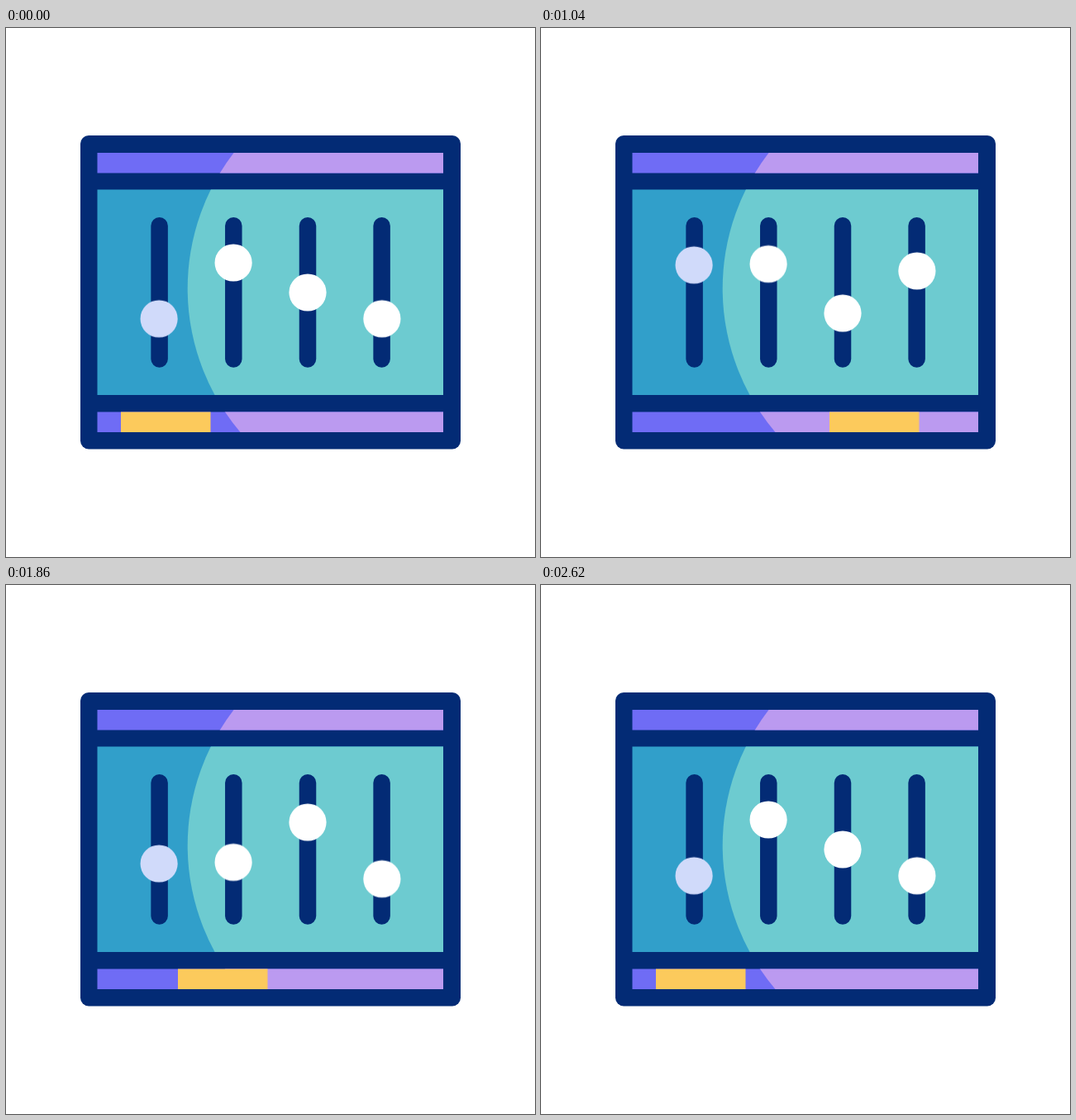
Animation of 640 by 640 pixels, one loop 3 s. Source, as an HTML page:

```html
<!DOCTYPE html>
<html lang="en">
<head>
<meta charset="utf-8">
<title>Mixer panel</title>
<style>
  html, body { margin: 0; width: 100%; height: 100%; overflow: hidden; background: #fff; }
  svg { display: block; width: 100%; height: 100%; }

  .move {
    animation: 3s cubic-bezier(.3333, 0, .6667, 1) infinite;
  }
  #bar { animation-name: bar; }
  #k1 { animation-name: k1; }
  #k2 { animation-name: k2; }
  #k3 { animation-name: k3; }
  #k4 { animation-name: k4; }

  @keyframes bar {
    0%, 6.667%    { transform: translateX(139px); }
    43.333%       { transform: translateX(383px); }
    73.333%       { transform: translateX(126px); }
    86.667%, 100% { transform: translateX(139px); }
  }
  @keyframes k1 {
    0%, 6.667%        { transform: translateY(351.8px); }
    33.333%, 46.667%  { transform: translateY(286.8px); }
    71.667%           { transform: translateY(362px); }
    86.667%, 100%     { transform: translateY(351.8px); }
  }
  @keyframes k2 {
    0%, 13.333%       { transform: translateY(284px); }
    26.667%           { transform: translateY(271.6px); }
    53.333%, 61.667%  { transform: translateY(335.5px); }
    83.333%, 100%     { transform: translateY(284px); }
  }
  @keyframes k3 {
    0%, 6.667%  { transform: translateY(320px); }
    26.667%     { transform: translateY(358.6px); }
    56.667%     { transform: translateY(282px); }
    80%, 100%   { transform: translateY(320px); }
  }
  @keyframes k4 {
    0%, 16.667%   { transform: translateY(351.8px); }
    43.333%       { transform: translateY(275px); }
    66.667%       { transform: translateY(364.8px); }
    86.667%, 100% { transform: translateY(351.8px); }
  }
</style>
</head>
<body>
<svg viewBox="0 0 640 640">
  <defs>
    <clipPath id="strips">
      <path d="M110.5 151h418.5v24.5h-418.5zM110.5 464.5h418.5v24.5h-418.5z"/>
    </clipPath>
    <clipPath id="panel"><rect x="110.5" y="195.5" width="418.5" height="248.5"/></clipPath>
  </defs>

  <rect x="90" y="130" width="460" height="379.5" rx="10" fill="#032b75"/>

  <g clip-path="url(#strips)">
    <rect x="110" y="150" width="420" height="340" fill="#6f6cf5"/>
    <path d="M530 140H284.5A269 269 0 0 0 290.5 497H530z" fill="#bb9af0"/>
    <rect id="bar" class="move" y="464" width="108.5" height="26" fill="#fcca5c"/>
  </g>

  <g clip-path="url(#panel)">
    <rect x="110" y="195" width="420" height="250" fill="#319fca"/>
    <path d="M530 140H284.5A269 269 0 0 0 290.5 497H530z" fill="#6dcbd0"/>
  </g>

  <path d="M185.6 239.3V400.5M275.3 239.3V400.5M365 239.3V400.5M454.6 239.3V400.5"
        stroke="#032b75" stroke-width="20.5" stroke-linecap="round"/>

  <circle id="k1" class="move" cx="185.1" r="22.6" fill="#d0dafa"/>
  <circle id="k2" class="move" cx="275.1" r="22.6" fill="#fff"/>
  <circle id="k3" class="move" cx="365" r="22.6" fill="#fff"/>
  <circle id="k4" class="move" cx="454.9" r="22.6" fill="#fff"/>
</svg>
</body>
</html>
```
